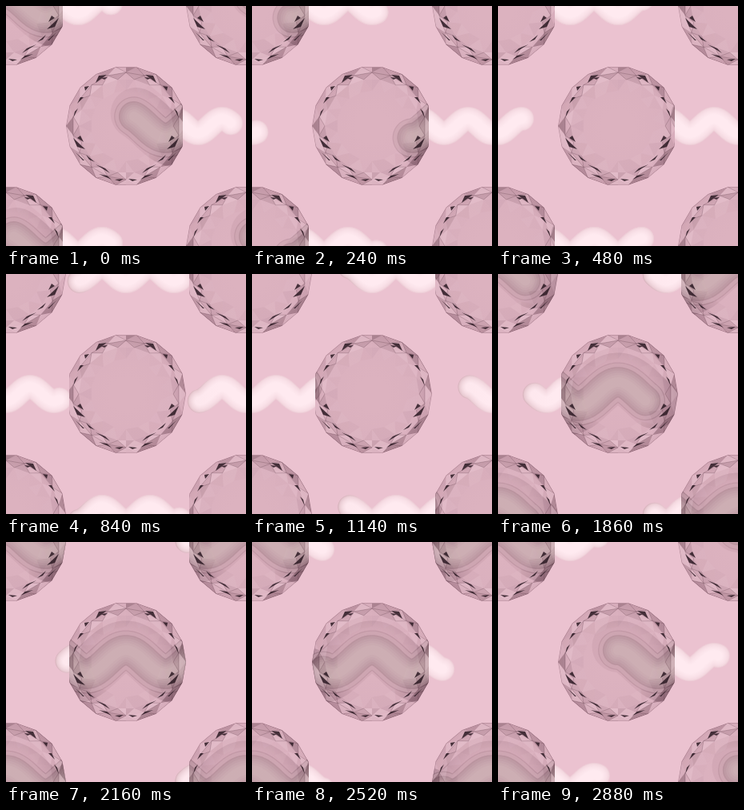
Animation, 300 px wide and 300 px high, one loop 2.94 s. Source, as an HTML page with a canvas:

```html
<!DOCTYPE html>
<html lang="en">
<head>
<meta charset="utf-8">
<title>Crystal balls</title>
<style>
  html, body { margin: 0; width: 100%; height: 100%; overflow: hidden; background: #ebc2d0; }
  canvas { display: block; width: 100vw; height: 100vh; }
</style>
</head>
<body>
<canvas id="stage" width="300" height="300"></canvas>
<script>
const ctx = document.getElementById('stage').getContext('2d');
const LOOP = 2940, STEP = 60, TILE = 300;
const R = 75, SIDES = 18, TUBE = 15, TAIL = 6, HEAD = 131;
const CENTERS = [[150, 150], [0, 0], [300, 0], [0, 300], [300, 300]];

let seed = 41;
function rand() {
  seed = (seed * 16807) % 2147483647;
  return seed / 2147483647;
}

const mix = (a, b, k) => 'rgb(' + a.map((v, i) => Math.round(v + (b[i] - v) * k)) + ')';
const waveY = x => -9 * Math.cos(x * Math.PI / 30);

// Centre line of the worm, relative to the ball it leaves.
function wormPath(shift) {
  const path = new Path2D();
  for (let x = TAIL; x <= HEAD; x++) path.lineTo(x + shift, waveY(x + shift));
  return path;
}

function strokeTube(g, path, width, style) {
  g.lineWidth = width;
  g.strokeStyle = style;
  g.stroke(path);
}

function drawWorm(path, shift) {
  for (let i = 0; i <= 10; i++) {
    const k = Math.sqrt(i / 10);
    const shade = ctx.createLinearGradient(TAIL + shift - TUBE, 0, TAIL + shift + 24, 0);
    shade.addColorStop(0, mix([216, 180, 189], [253, 231, 237], k));
    shade.addColorStop(1, mix([238, 206, 215], [255, 234, 240], k));
    strokeTube(ctx, path, 2 * TUBE - i * 1.9, shade);
  }
}

function ballOutline() {
  const p = new Path2D();
  for (let i = 0; i < SIDES; i++) {
    const a = i * 2 * Math.PI / SIDES;
    p.lineTo(R * Math.cos(a), R * Math.sin(a));
  }
  p.closePath();
  return p;
}
const outline = ballOutline();

function poly(g, points, style) {
  g.beginPath();
  for (let i = 0; i < points.length; i += 2) g.lineTo(points[i], points[i + 1]);
  g.closePath();
  g.fillStyle = style;
  g.fill();
}

const SHARDS = [
  [24, -64, 34, -63, 38, -54], [23, -61, 31, -60, 27, -58], [46, -50, 52, -49, 51, -44],
  [53, -36, 57, -36, 61, -28], [60, -22, 64, -18, 66, -10],
  [66, 15, 61, 26, 51, 29], [57, 12, 61, 15, 53, 20], [50, 36, 46, 42, 39, 45],
  [63, 33, 54, 43, 52, 43], [38, 48, 20, 59, 26, 53], [34, 60, 18, 67, 24, 62],
  [3, 66, 14, 67, 8, 69]
];

function drawHalf(g) {
  g.save();
  g.beginPath();
  g.rect(0, -R, R, 2 * R);
  g.clip();
  const rings = [75, 67, 59, 44];
  const at = (ring, k) => {
    const a = (k + (ring % 2) / 2) * 2 * Math.PI / SIDES;
    return [rings[ring] * Math.cos(a), rings[ring] * Math.sin(a)];
  };
  const tint = ring => {
    const v = rand();
    if (v < 0.45) return `rgba(255,226,236,${rand() * [0.3, 0.22, 0.06][ring]})`;
    return `rgba(75,40,55,${rand() * [0.32, 0.16, 0.04][ring]})`;
  };
  const edge = `rgba(70,40,52,.28)`;
  for (let ring = 0; ring < 3; ring++) {
    const d = ring % 2;
    for (let k = -6; k <= 6; k++) {
      const a = at(ring, k), b = at(ring, k + 1);
      const c = at(ring + 1, k + d), e = at(ring + 1, k + d + 1);
      poly(g, [...a, ...b, ...c], tint(ring));
      if (ring < 2 && rand() < 0.6) {
        g.lineWidth = 0.8;
        g.strokeStyle = edge;
        g.stroke();
      }
      poly(g, [...b, ...c, ...e], tint(ring));
    }
  }
  for (const s of SHARDS) poly(g, s, 'rgba(43,25,35,.85)');
  g.restore();
}

function makeFacets() {
  const c = document.createElement('canvas');
  c.width = c.height = 160;
  const g = c.getContext('2d');
  g.translate(80, 80);
  g.clip(outline);
  drawHalf(g);
  g.scale(-1, 1);
  drawHalf(g);
  g.lineWidth = 1.2;
  g.strokeStyle = 'rgba(90,55,70,.35)';
  g.stroke(outline);
  return c;
}
const facets = makeFacets();

function limbShade(inner, outer, size) {
  const s = ctx.createRadialGradient(0, 0, size * 0.55, 0, 0, size);
  s.addColorStop(0, inner);
  s.addColorStop(1, outer);
  return s;
}

// The worm seen through the glass, enlarged about the ball's centre.
function drawRefraction(path) {
  ctx.save();
  ctx.scale(2.15, 2.15);
  strokeTube(ctx, path, 30, limbShade('rgba(150,105,120,.12)', 'rgba(105,70,85,.34)', R / 2.15));
  ctx.restore();
  ctx.save();
  ctx.scale(1.65, 1.65);
  strokeTube(ctx, path, 30, limbShade('rgba(145,105,118,.26)', 'rgba(105,72,84,.4)', R / 1.65));
  strokeTube(ctx, path, 28.5, 'rgba(222,184,195,.4)');
  strokeTube(ctx, path, 23, limbShade('rgba(140,105,115,.3)', 'rgba(105,72,84,.36)', R / 1.65));
  for (let i = 0; i < 5; i++) strokeTube(ctx, path, 21 - i * 3.4, 'rgba(216,190,195,.16)');
  ctx.restore();
}

// A thin slice of the rim is hidden on the side where the worm shows.
function drawBall(paths, left, right) {
  ctx.beginPath();
  ctx.rect(left, -R, right - left, 2 * R);
  ctx.clip();
  ctx.clip(outline);
  const body = ctx.createRadialGradient(0, 0, 20, 0, 0, R);
  body.addColorStop(0, '#dcb2bf');
  body.addColorStop(0.75, '#dab0be');
  body.addColorStop(1, '#d2a6b5');
  ctx.fillStyle = body;
  ctx.fillRect(-R, -R, 2 * R, 2 * R);
  paths.forEach(drawRefraction);
  ctx.drawImage(facets, -80, -80);
}

function atEach(draw) {
  for (const [x, y] of CENTERS) {
    ctx.save();
    ctx.translate(x, y);
    draw();
    ctx.restore();
  }
}

function render(t) {
  const shift = TILE * t / LOOP;
  const shifts = [shift, shift - TILE];
  const paths = shifts.map(wormPath);
  const entering = t > 660 && t < 2500;
  const rim = entering ? [-71, R] : [-R, 71];
  ctx.fillStyle = '#ebc2d0';
  ctx.fillRect(0, 0, TILE, TILE);
  ctx.lineCap = ctx.lineJoin = 'round';
  atEach(() => paths.forEach((p, i) => drawWorm(p, shifts[i])));
  atEach(() => drawBall(paths, ...rim));
}

const start = performance.now();
function tick() {
  const t = (performance.now() - start) % LOOP;
  render(Math.floor(t / STEP) * STEP);
  requestAnimationFrame(tick);
}
tick();
</script>
</body>
</html>
```
